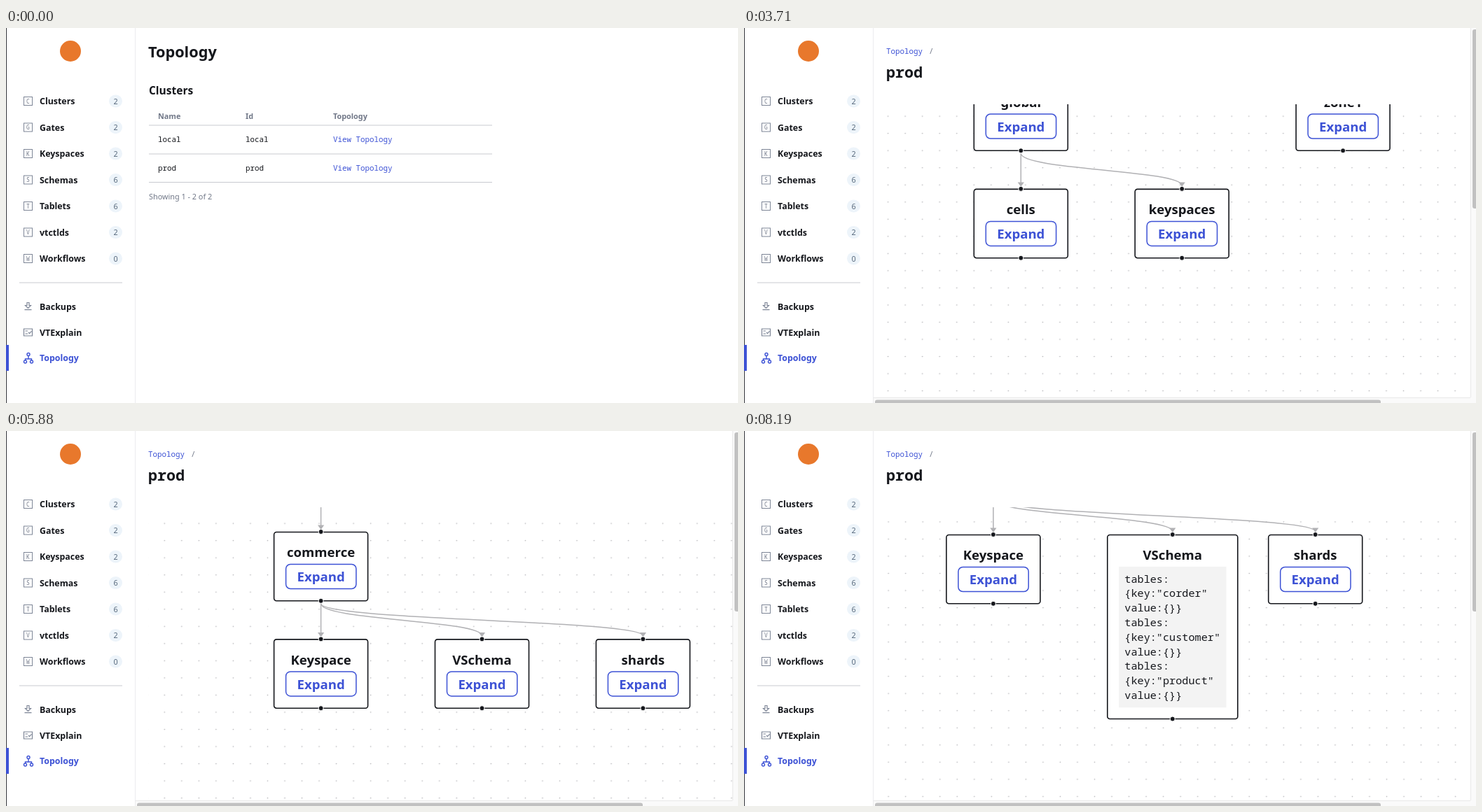
Write an HTML page that moves like this. It is 1045 px wide and 536 px high and loops after 8260 ms.

```html
<!DOCTYPE html>
<html lang="en">
<head>
<meta charset="utf-8">
<title>Topology</title>
<style>
  html, body { margin: 0; width: 100%; height: 100%; overflow: hidden; background: #fff; }
  svg { display: block; width: 1045px; height: 536px; }
  text { font-family: "Noto Sans", sans-serif; fill: #15171c; }
  .mono { font-family: "Noto Sans Mono", monospace; }
  .nav { font-size: 12.4px; font-weight: 600; }
  .small { font-size: 10.85px; }
  .h1 { font-size: 21.7px; font-weight: 700; }
  .h2 { font-size: 15.5px; font-weight: 700; }
  .node { font-size: 18.6px; font-weight: 600; text-anchor: middle; }
  .code { font-size: 15.2px; }
  text.blue { fill: #3d52d5; }
  text.grey { fill: #717888; }
  .mid { text-anchor: middle; }
  .icon { fill: none; stroke: #7d8596; stroke-width: 1.2; }
  .rule { stroke: #c8cad0; }
  .edge { fill: none; stroke: #b1b1b4; stroke-width: 1.5; }
</style>
</head>
<body>
<svg id="stage" viewBox="0 0 1045 536"></svg>
<script>
const LOOP = 8260, STEP = 70;
const GRID = 24.53, COL = 229.9, ROW = 153.4, W = 134, H = 98.3;
const OPEN_PAGE = 1190, OPEN_GLOBAL = 2800, OPEN_KEYSPACES = 4130,
      OPEN_COMMERCE = 5250, OPEN_VSCHEMA = 6720;

// Pan of the graph: time, x, y of the first node
const PAN = [
  [0, 498, 501.5], [1750, 498, 501.5], [1960, 497, 463.8], [2450, 436.5, 235],
  [3360, 436.5, 235], [3710, 328.3, 77], [3850, 313, 55],
  [4480, 313, 55], [4830, 293.1, -21.4], [4900, 292, -23.5],
  [5530, 292, -23.5], [5880, 152.7, -162.3], [6020, 135.7, -180.8],
  [6930, 135.7, -180.8], [7140, 135.2, -182.3], [7630, 59, -311.7],
  [LOOP, 59, -311.7]
];

const text = (x, y, cls, s, extra = '') => `<text x="${x}" y="${y}" class="${cls}" ${extra}>${s}</text>`;
const rect = (x, y, w, h, attrs) => `<rect x="${x}" y="${y}" width="${w}" height="${h}" ${attrs}/>`;
const line = (x1, y1, x2, y2, attrs) => `<line x1="${x1}" y1="${y1}" x2="${x2}" y2="${y2}" ${attrs}/>`;
const dot = (x, y) => `<circle cx="${x}" cy="${y}" r="3.5" fill="#15171c" stroke="#fff"/>`;

function sidebar() {
  const items = [['Clusters', 2], ['Gates', 2], ['Keyspaces', 2], ['Schemas', 6],
                 ['Tablets', 6], ['vtctlds', 2], ['Workflows', 0]];
  let s = '<circle cx="92" cy="33" r="15" fill="#e8782c"/>';
  items.forEach(([name, count], i) => {
    const y = 104.5 + 37.5 * i;
    s += rect(25.5, y - 6, 12, 12, 'class="icon" style="stroke-width:1"')
      + text(31.5, y + 3, 'mono mid grey', name[0].toUpperCase(), 'font-size="8"')
      + text(48, y + 4.5, 'nav', name)
      + rect(147, y - 9, 19, 18, 'rx="9" fill="#edf4fa"')
      + text(156.5, y + 4, 'mid', count, 'font-size="10.85" font-weight="500" style="fill:#596b7e"');
  });
  return s + line(19, 364, 166, 364, 'class="rule"')
    + '<path d="M30 392.5h3v4h2.5l-4 4-4-4H30zM26.5 402.7h10" class="icon"/>'
    + '<path d="M25.5 430h12v10h-12zM27.5 433h3.5M27.5 437h3.5M32 435l1.5 1.6 3-3.2" class="icon"/>'
    + '<path d="M32 469v4M27.5 475v-2h9v2M32 473v0" class="icon" style="stroke:#3d52d5;stroke-width:1.4"/>'
    + [[32, 466.5], [27.5, 477], [36.5, 477]].map(([x, y]) =>
        `<circle cx="${x}" cy="${y}" r="2" class="icon" style="stroke:#3d52d5;stroke-width:1.4"/>`).join('')
    + text(48, 403, 'nav', 'Backups') + text(48, 439.5, 'nav', 'VTExplain')
    + text(48, 476, 'nav blue', 'Topology')
    + line(184.5, 0, 184.5, 536, 'stroke="#ececee"')
    + rect(0, 0, 1, 536, 'fill="#33343a"')
    + rect(0, 453, 4, 37, 'fill="#3d52d5"');
}

function clusterList() {
  const cols = [217, 342, 467];
  let s = text(203, 41.5, 'h1', 'Topology') + text(204, 94.5, 'h2', 'Clusters');
  ['Name', 'Id', 'Topology'].forEach((h, i) =>
    s += text(cols[i], 130, 'small grey', h, 'font-weight="600"'));
  ['local', 'prod'].forEach((name, i) => {
    const y = 163 + 40.7 * i;
    s += text(cols[0], y, 'small mono', name) + text(cols[1], y, 'small mono', name)
      + text(cols[2], y, 'small mono blue', 'View Topology');
  });
  [139, 180, 220.5].forEach(y => s += line(204, y, 694, y, 'class="rule"'));
  return s + text(204, 244.5, 'small grey', 'Showing 1 - 2 of 2');
}

function box(name, w, h, hasTop, body) {
  return rect(0, 0, w, h, 'rx="3.5" fill="#fff" stroke="#15171c" stroke-width="1.6"')
    + text(w / 2, 35.7, 'node', name) + body
    + (hasTop ? dot(w / 2, -0.5) : '') + dot(w / 2, h);
}

const button = rect(17, 46, 100.3, 35, 'rx="6.5" fill="#fff" stroke="#3d52d5" stroke-width="1.5"')
  + text(W / 2, 70.7, 'node blue', 'Expand');

function schemaCode() {
  const rows = ['corder', 'customer', 'product'].flatMap(t => ['tables:', `{key:"${t}"`, 'value:{}}']);
  return rect(16.3, 45.3, 153.5, 201.5, 'fill="#f3f3f3"')
    + rows.map((r, i) => text(24.5, 68 + 20.8 * i, 'code mono', r)).join('');
}

const place = (col, row, inner, from = 0, to = LOOP) =>
  `<g data-from="${from}" data-to="${to}" transform="translate(${col * COL} ${row * ROW})">${inner}</g>`;

const node = (name, col, row, from, to) =>
  place(col, row, box(name, W, H, row > 0, button), from, to);

// Edge from a parent down to the node at (col, row)
function edge(parentCol, col, row, from, to, width = W) {
  const sx = parentCol * COL + W / 2, sy = (row - 1) * ROW + H + 4;
  const tx = col * COL + width / 2, ty = row * ROW - 4, my = (sy + ty) / 2;
  return `<g data-from="${from}" data-to="${to || LOOP}">`
    + `<path class="edge" d="M${sx} ${sy}C${sx} ${my} ${tx} ${my} ${tx} ${ty - 1}"/>`
    + `<path fill="#b1b1b4" d="M${tx - 4.6} ${ty - 6}h9.2L${tx} ${ty + 0.5}z"/></g>`;
}

function graph() {
  return edge(0, 0, 1, OPEN_GLOBAL) + edge(0, 1, 1, OPEN_GLOBAL)
    + edge(1, 1, 2, OPEN_KEYSPACES)
    + edge(1, 1, 3, OPEN_COMMERCE) + edge(1, 3, 3, OPEN_COMMERCE)
    + edge(1, 2, 3, OPEN_COMMERCE, OPEN_VSCHEMA) + edge(1, 2, 3, OPEN_VSCHEMA, LOOP, 186)
    + node('global', 0, 0)
    + node('zone1', 1, 0, 0, OPEN_GLOBAL) + node('zone1', 2, 0, OPEN_GLOBAL)
    + node('cells', 0, 1, OPEN_GLOBAL) + node('keyspaces', 1, 1, OPEN_GLOBAL)
    + node('commerce', 1, 2, OPEN_KEYSPACES)
    + node('Keyspace', 1, 3, OPEN_COMMERCE) + node('shards', 3, 3, OPEN_COMMERCE)
    + node('VSchema', 2, 3, OPEN_COMMERCE, OPEN_VSCHEMA)
    + place(2, 3, box('VSchema', 186, 263, true, schemaCode()), OPEN_VSCHEMA);
}

function topologyPage() {
  return text(203, 37, 'small mono blue', 'Topology') + text(264, 37, 'small mono grey', '/')
    + text(203, 71, 'h1 mono', 'prod', 'style="font-weight:600"')
    + `<g clip-path="url(#view)">${rect(203, 109, 834, 419, 'fill="url(#dots)"')}<g id="graph">${graph()}</g></g>`
    + rect(1037, 0, 8, 536, 'fill="#fafafa"') + rect(185, 528, 860, 8, 'fill="#fafafa"')
    + line(1037.5, 0, 1037.5, 528, 'stroke="#e8e8e8"') + line(185, 528.5, 1037, 528.5, 'stroke="#e8e8e8"')
    + rect(1040, 2, 7, 256, 'rx="3" fill="#c1c1c1"') + rect(187, 531.5, 722, 7, 'rx="3" fill="#c1c1c1"');
}

const stage = document.getElementById('stage');
stage.innerHTML = `<defs>
    <clipPath id="view">${rect(203, 109, 834, 419, '')}</clipPath>
    <pattern id="dots" width="${GRID}" height="${GRID}" patternUnits="userSpaceOnUse">
      <circle cx="${GRID / 2}" cy="${GRID / 2}" r="0.85" fill="#b4b4b8"/>
    </pattern>
  </defs>
  <g data-from="0" data-to="${OPEN_PAGE}">${clusterList()}</g>
  <g data-from="${OPEN_PAGE}" data-to="${LOOP}">${topologyPage()}</g>` + sidebar();

const graphEl = document.getElementById('graph');
const dots = document.getElementById('dots');
const timed = [...stage.querySelectorAll('[data-from]')].map(el =>
  ({ el, from: +el.dataset.from, to: +el.dataset.to }));

const slope = (i, k) => (PAN[i + 1][k] - PAN[i][k]) / (PAN[i + 1][0] - PAN[i][0]);

// Harmonic mean keeps the curve monotone and holds flat
function tangent(i, k) {
  if (i === 0 || i === PAN.length - 1) return 0;
  const a = slope(i - 1, k), b = slope(i, k);
  return a * b > 0 ? 2 * a * b / (a + b) : 0;
}

function panAt(t, k) {
  let i = 0;
  while (i < PAN.length - 2 && t >= PAN[i + 1][0]) i++;
  const d = PAN[i + 1][0] - PAN[i][0], u = (t - PAN[i][0]) / d, v = 1 - u;
  return v * v * (1 + 2 * u) * PAN[i][k] + u * u * (1 + 2 * v) * PAN[i + 1][k]
    + d * u * v * (v * tangent(i, k) - u * tangent(i + 1, k));
}

function render(ms) {
  const t = Math.floor((ms % LOOP) / STEP) * STEP;
  for (const { el, from, to } of timed) el.style.display = t >= from && t < to ? '' : 'none';
  const x = panAt(t, 1), y = panAt(t, 2);
  graphEl.setAttribute('transform', `translate(${x} ${y})`);
  dots.setAttribute('patternTransform', `translate(${x - GRID / 2} ${y - GRID / 2})`);
}

const start = performance.now();
function tick() {
  render(performance.now() - start);
  requestAnimationFrame(tick);
}
tick();
</script>
</body>
</html>
```
